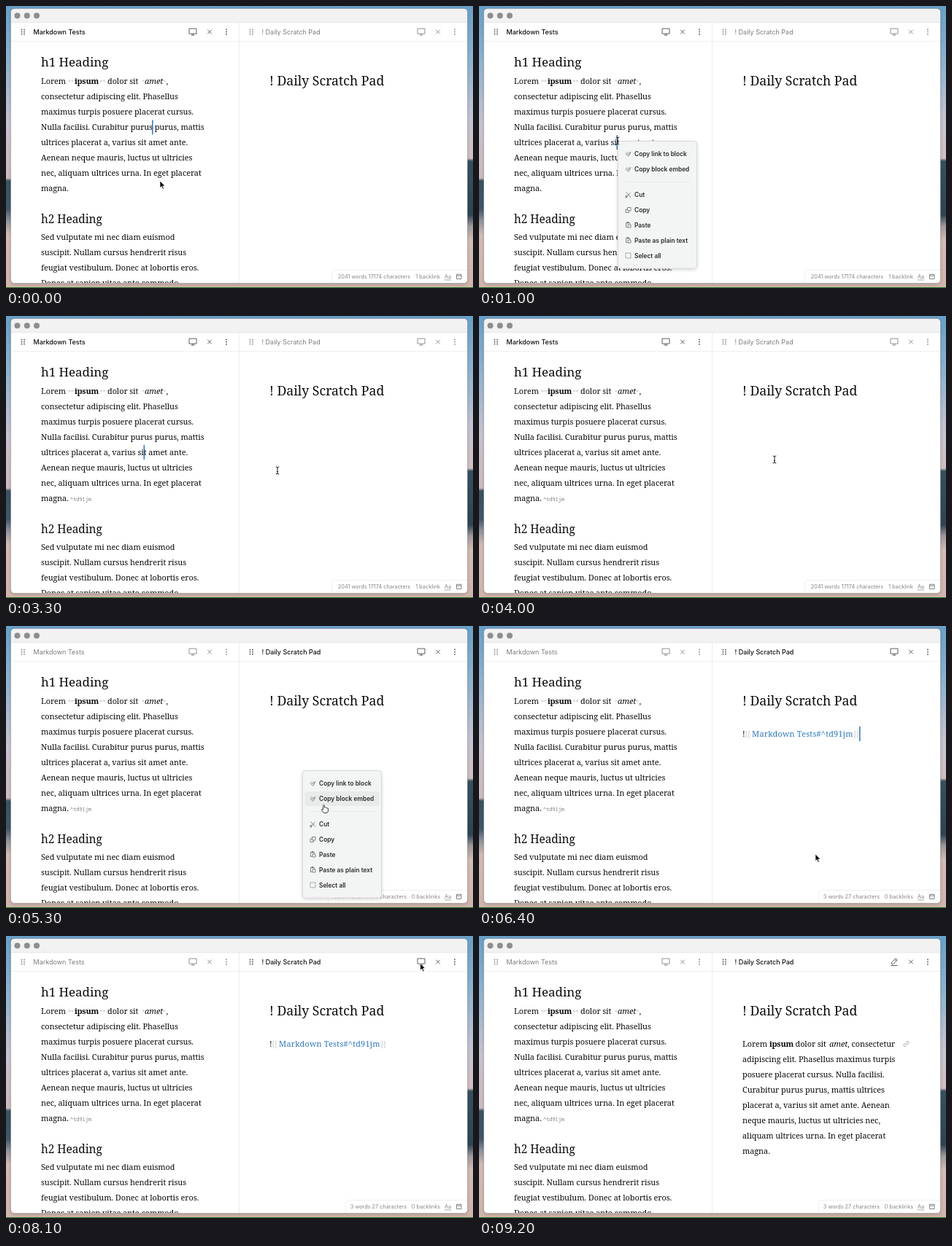
These frames come from a looping animation (640x387 px, 9300 ms). An HTML page:

```html
<!DOCTYPE html>
<html lang="en">
<head>
<meta charset="utf-8">
<title>Copying a block embed between notes</title>
<style>
html, body { margin: 0; width: 100%; height: 100%; overflow: hidden; }
svg { display: block; width: 640px; height: 387px; }
text { white-space: pre; fill: #0c0c0c; font: 10.9px "Noto Serif", serif; letter-spacing: -.06px; }
.h1 { font-size: 17px; }
.h2 { font-size: 15.45px; }
.title { font-size: 17.8px; }
.b { font-weight: 700; letter-spacing: -.25px; }
.i { font-style: italic; }
.faint { fill: #cfcfcf; }
.star { fill: #c4c4c4; font-size: 8px; }
.link { fill: #2f78ba; letter-spacing: .22px; }
.id { fill: #7c7c7c; font: 6.9px "Noto Sans Mono", monospace; letter-spacing: 0; }
.tab { font: 9px Inter, sans-serif; letter-spacing: 0; }
.item { fill: #2c2c2c; font: 600 8.35px Inter, sans-serif; letter-spacing: 0; }
.status { fill: #858585; font: 7.3px Inter, sans-serif; letter-spacing: 0; }
.end { text-anchor: end; }
.ico { fill: none; stroke: #777; stroke-width: .9; }
.caret { fill: #3b7dc0; }
.head { --ink: #7c7c7c; --tone: #909090; }
.head.on { --ink: #111; --tone: #5e5e5e; }
.head text { fill: var(--ink); }
.head.on text { font-weight: 500; }
.head path { fill: none; stroke: var(--tone); }
.head circle { fill: var(--tone); }
</style>
</head>
<body>
<svg id="stage" viewBox="0 0 640 387"></svg>
<script>
const text = (x, y, s, cls = '') => `<text x="${x}" y="${y}" class="${cls}">${s}</text>`;
const lines = (x, y, list) => list.map((s, i) => text(x, y + 21 * i, s)).join('');
const rect = (x, y, w, h, fill, more = '') =>
  `<rect x="${x}" y="${y}" width="${w}" height="${h}" fill="${fill}" ${more}/>`;
const dots = (xs, ys, r) => xs.flatMap(x => ys.map(y => `<circle cx="${x}" cy="${y}" r="${r}"/>`)).join('');
const gradient = (id, stops) => `<linearGradient id="${id}" x2="0" y2="1">` +
  stops.map(([o, c]) => `<stop offset="${o}" stop-color="${c}"/>`).join('') + '</linearGradient>';

const screenIcon = 'M-5-4.5H5V2.5H-5ZM-2.5 4.5H2.5M0 2.5V4.5';
const pencilIcon = 'M-3.5 3V.8L2-4.7L4.2-2.5L-1.3 3ZM.6-3.3L2.8-1.1M-4.5 5H4.5';

const header = (id, x, title) => `<g id="${id}" class="head" transform="translate(${x} 35.5)">
  ${dots([1.5, 5], [-3, 0, 3], .95)}${text(17.5, 3.2, title, 'tab')}
  <path class="view" transform="translate(236)" d="${screenIcon}"/>
  <path transform="translate(259)" d="M-2.8-2.8L2.8 2.8M2.8-2.8L-2.8 2.8"/>
  ${dots([282], [-3.3, 0, 3.3], .95)}</g>`;

const linkIcon = 'M-3.5-1L-1 2.5Q0 3.5 1 2.5L3.5-3M-2-2.5L.5 1M1-2.5L2 0';
const clipIcon = 'M-1 3H-3V-3H2V-1M-1.5-4H.5V-2.5H-1.5ZM-.5-.5H3.5V3.5H-.5Z';
const menuItems = [
  [18, 'Copy link to block', linkIcon],
  [39, 'Copy block embed', linkIcon],
  [74, 'Cut', 'M-3-3.5L2 2M-3 3.5L3-3M-3.5 2.5A1 1 0 1 0-1.8 3A1 1 0 1 0-3.5 2.5M2 1.8L3.5 3.5'],
  [95, 'Copy', 'M-1-3.5H3.5V1H-1ZM-1-1H-3.5V3.5H1V1'],
  [115.5, 'Paste', clipIcon],
  [136.5, 'Paste as plain text', clipIcon],
  [157.5, 'Select all', 'M-3.5-3.5H3.5V3.5H-3.5Z" stroke-dasharray="1.5 1']
];

const body = ['consectetur adipiscing elit. Phasellus', 'maximus turpis posuere placerat cursus.',
  'Nulla facilisi. Curabitur purus purus, mattis', 'ultrices placerat a, varius sit amet ante.',
  'Aenean neque mauris, luctus ut ultricies', 'nec, aliquam ultrices urna. In eget placerat', 'magna.'];
const second = ['Sed vulputate mi nec diam euismod', 'suscipit. Nullam cursus hendrerit risus',
  'feugiat vestibulum. Donec at lobortis eros.', 'Donec at sapien vitae ante commodo'];
const embed = ['adipiscing elit. Phasellus maximus turpis', 'posuere placerat cursus. Nulla facilisi.',
  'Curabitur purus purus, mattis ultrices', 'placerat a, varius sit amet ante. Aenean',
  'neque mauris, luctus ut ultricies nec,', 'aliquam ultrices urna. In eget placerat', 'magna.'];

stage.innerHTML = `<defs>
  ${gradient('left', [[0, '#68a0c9'], [.2, '#91b4d0'], [.42, '#c9c4d0'], [.61, '#cdbbc0'], [.62, '#3a5262'],
    [.72, '#41586a'], [.76, '#8f929c'], [.81, '#d3bcb4'], [1, '#d0b5ac']])}
  ${gradient('right', [[0, '#68a0c9'], [.2, '#8fb3d0'], [.4, '#c5c4d1'], [.54, '#d2bfc3'], [.55, '#36505f'],
    [.74, '#2f4554'], [.78, '#a19a9d'], [.83, '#d3bcb4'], [1, '#d0b5ac']])}
  <clipPath id="frame"><rect x="7" y="4" width="625" height="376" rx="5"/></clipPath>
  <filter id="soft" x="-20%" y="-20%" width="140%" height="140%"><feDropShadow dx="0" dy="1.5" stdDeviation="2" flood-opacity=".18"/></filter>
</defs>
${rect(0, 0, 320, 387, 'url(#left)')}${rect(320, 0, 320, 387, 'url(#right)')}
${rect(6.5, 3.5, 626, 377, '#fff', 'rx="5.5" stroke="#0003" filter="url(#soft)"')}
${rect(0, 386, 640, 1, '#1d6f1f')}
<g clip-path="url(#frame)">
  ${rect(7, 4, 625, 376, '#fff')}${rect(7, 4, 625, 19, '#f3f2f2')}
  <g fill="#8e8e8e">${dots([15.5, 28.8, 42], [13.3], 4)}</g>
  ${rect(7, 22.5, 625, .7, '#e2e2e2')}${rect(7, 48, 625, 1, '#efefef')}${rect(319, 23, 1, 357, '#ebebeb')}
  ${header('leftHead', 20, 'Markdown Tests')}${header('rightHead', 333, '! Daily Scratch Pad')}

  ${text(48, 82.5, 'h1 Heading', 'h1')}
  ${text(48, 107.3, 'Lorem')}${text(85, 108, '**', 'star')}${text(94, 107.3, 'ipsum', 'b')}
  ${text(128.5, 108, '**', 'star')}${text(139, 107.3, 'dolor sit')}${text(186, 108, '*', 'star')}
  ${text(190, 107.3, 'amet', 'i')}${text(215, 108, '*', 'star')}${text(219.5, 107.3, ',')}
  ${lines(48, 128.3, body)}
  ${text(48, 298, 'h2 Heading', 'h2')}${lines(48, 321.3, second)}
  <g id="blockId">${text(88, 253.8, '^td91jm', 'id')}</g>
  <rect id="leftCaret" class="caret" width="1.6" height="20"/>

  ${text(361, 109.3, '! Daily Scratch Pad', 'title')}
  <g id="source">${text(361, 152, '!')}${text(364.5, 152, '[[', 'faint')}
    ${text(374, 152, 'Markdown Tests#^td91jm', 'link')}${text(513, 152, ']]', 'faint')}</g>
  <g id="preview">${text(361, 152, 'Lorem')}${text(398, 152, 'ipsum', 'b')}${text(433.5, 152, 'dolor sit')}
    ${text(480, 152, 'amet', 'i')}${text(505, 152, ', consectetur')}${lines(361, 173, embed)}
    <g transform="translate(585.5 148) rotate(-40)" fill="none" stroke="#b5b5b5">
      <path d="M-.8-1.7H-2.5A1.7 1.7 0 0 0-2.5 1.7H-.8M.8-1.7H2.5A1.7 1.7 0 0 1 2.5 1.7H.8M-1.7 0H1.7"/></g></g>
  <rect id="rightCaret" class="caret" y="138" width="1.6" height="20"/>

  <path id="statusBox" fill="#fff" stroke="#f0f0f0"/>
  <text id="words" y="374.3" class="status end"></text>
  <text id="backlinks" x="595" y="374.3" class="status end"></text>
  ${text(601, 374.3, 'Aa', 'status')}${rect(601, 375.6, 9, .7, '#858585')}
  <path class="ico" d="M617.5 368.3H624V374.5H617.5ZM617.5 370.2H624"/>
</g>
<g id="menu">
  ${rect(.5, .5, 108, 174.5, '#f3f4f4', 'rx="4" stroke="#d9dada" filter="url(#soft)"')}
  ${rect(3.5, 29, 102, 20, '#e9eaea', 'id="hover" rx="2"')}${rect(10, 56, 89, .8, '#e7e8e8')}
  ${menuItems.map(([y, s, d]) => text(23, y + 3, s, 'item') +
    `<path class="ico" transform="translate(14.5 ${y})" d="${d}"/>`).join('')}
</g>
<g id="mouse">
  <path id="arrow" d="M0 0V9.6L2.2 7.6L3.8 11.2L5.4 10.5L3.8 7H6.8Z" fill="#000" stroke="#fff" stroke-width=".7"/>
  <path id="beam" d="M-2.3-5Q0-5 0-3.5Q0-5 2.3-5M0-4V4M-2.3 5Q0 5 0 3.5Q0 5 2.3 5M-1 1.5H1" fill="none" stroke="#222"/>
  <path id="hand" d="M-.9 7V1Q0-.4 .9 1V4.2Q2 3.3 2.7 4.5Q3.8 3.7 4.4 5Q6 4.5 6 6V8Q6 10.2 4.6 11.5H.2Q-1.3 9.5-3 7.2Q-2.6 5.4-.9 7Z" fill="#fff" stroke="#222" stroke-width=".85" stroke-linejoin="round"/>
</g>`;

const el = id => document.getElementById(id);
const show = (id, on) => el(id).setAttribute('display', on ? 'inline' : 'none');
const set = (id, attrs) => { for (const k in attrs) el(id).setAttribute(k, attrs[k]); };

const LOOP = 9300, OPEN_LEFT = 900, COPIED = 3000, FOCUS = 4300, OPEN_RIGHT = 4800, PASTED = 6200, READING = 8300;

// time, x, y of the pointer
const route = [[0, 211, 240], [100, 211, 240], [500, 190, 185], [1300, 190, 185], [1500, 200, 196],
  [2200, 290, 223], [2600, 288, 225], [3000, 288, 225], [3300, 372, 212], [3700, 380, 208], [4000, 405, 197],
  [5200, 405, 197], [5300, 435.5, 245], [6000, 458, 312], [6400, 461, 313], [6600, 461, 313],
  [7600, 564, 44], [8200, 568, 37], [8800, 568, 37], [9200, 600, 395], [9300, 600, 395]];

function pointer(t) {
  const n = route.findIndex(p => p[0] > t);
  const [t0, x0, y0] = route[n - 1], [t1, x1, y1] = route[n];
  const k = (t - t0) / (t1 - t0), e = k * k * (3 - 2 * k);
  return [x0 + (x1 - x0) * e, y0 + (y1 - y0) * e];
}

const blink = (t, start) => (t - start) % 1060 < 530;

function draw(t) {
  const [x, y] = pointer(t);
  const right = t >= FOCUS, pasted = t >= PASTED, reading = t >= READING;

  el('leftHead').classList.toggle('on', !right);
  el('rightHead').classList.toggle('on', right);
  el('rightHead').querySelector('.view').setAttribute('d', reading ? pencilIcon : screenIcon);

  const clicked = t >= OPEN_LEFT;
  show('leftCaret', !right && blink(t, clicked ? OPEN_LEFT : 0));
  set('leftCaret', clicked ? { x: 188.5, y: 177 } : { x: 200, y: 156.5 });
  show('rightCaret', right && !reading && blink(t, pasted ? PASTED : FOCUS));
  set('rightCaret', { x: pasted ? 521 : 361 });
  show('blockId', t >= COPIED);
  show('source', pasted && !reading);
  show('preview', reading);

  el('words').textContent = pasted ? '3 words 27 characters' : '2041 words 17174 characters';
  el('backlinks').textContent = right ? '0 backlinks' : '1 backlink';
  set('words', { x: right ? 549 : 554 });
  const edge = pasted ? 465.5 : right ? 441.5 : 446.5;
  set('statusBox', { d: `M${edge} 381V366Q${edge} 362.5 ${edge + 4} 362.5H633V381Z` });

  const menuAt = clicked && t < COPIED ? [190, 185] : t >= OPEN_RIGHT && !pasted ? [406, 198] : null;
  let over = false, row;
  show('menu', menuAt);
  if (menuAt) {
    const [mx, my] = menuAt;
    set('menu', { transform: `translate(${mx} ${my})` });
    over = x > mx && x < mx + 109 && y > my;
    row = over && menuItems.find(([c]) => Math.abs(y - my - c) < 10);
    if (row) set('hover', { y: row[0] - 10 });
  }
  show('hover', row);

  const kind = over ? 'hand' : t < 200 || pasted ? 'arrow' : 'beam';
  for (const id of ['arrow', 'beam', 'hand']) show(id, id === kind);
  set('mouse', { transform: `translate(${x} ${y})` });
}

const begin = performance.now();
function tick() {
  const t = (performance.now() - begin) % LOOP;
  draw(Math.floor(t / 100) * 100);
  requestAnimationFrame(tick);
}
tick();
</script>
</body>
</html>
```
